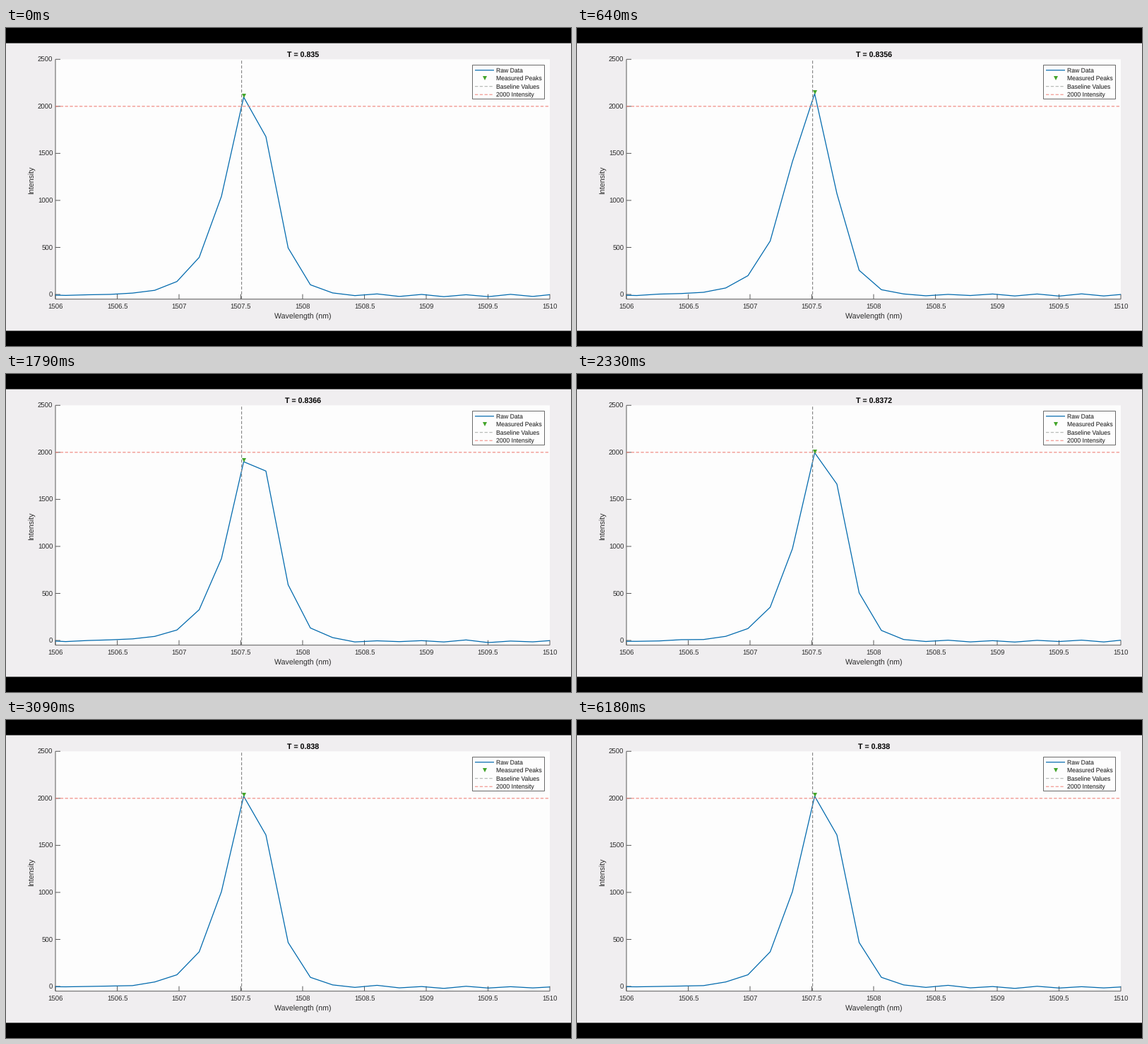
These frames come from a looping animation (800x450 px, 6670 ms). A matplotlib script:

```python
import numpy as np
import matplotlib.pyplot as plt
from matplotlib.animation import FuncAnimation
from matplotlib.patches import Rectangle

W, H, DPI = 800, 450, 100
FRAMES, INTERVAL = 230, 29

LEFT, RIGHT, TOP, BOTTOM = 70, 770, 44.3, 383.7
INK, AXIS, BLUE, GREEN = "#2b2b2b", "#5a5a5a", "#0069ad", "#43a52a"
RED, GRAY, PAPER = "#ee8078", "#808080", "#fdfdfd"

# Moments (ms) at which T advances by 0.0002
STEPS = (30, 210, 520, 1090, 1180, 1270, 1580, 1700, 1940,
         2210, 2270, 2450, 2550, 2880, 3000)

# The peak swings left, then right, and settles
SWING_STEPS = (0, 3, 6, 11, 15)
SWING = (0, -0.4, 0.22, 0.04, 0)

K = np.arange(-1, 23)          # sample index
XS = 84.6 + 31.49 * K
NOISE = np.random.default_rng(7).normal(0, 4, (len(STEPS) + 1, len(K)))

plt.rcParams["font.family"] = "Liberation Sans"
plt.rcParams["text.hinting"] = "none"
plt.rcParams["lines.scale_dashes"] = False


def pt(px):
    return px * 72 / DPI


def y_px(value):
    return BOTTOM - (value + 50) * (BOTTOM - TOP) / 2550


def x_px(nm):
    return LEFT + (nm - 1506) * (RIGHT - LEFT) / 4


def spectrum(step):
    """Lopsided peak: exponential flanks with a rounded top, plus ripple."""
    u = K - 8 - np.interp(step, SWING_STEPS, SWING)
    gain = np.interp(step, (0, 3), (1.04, 1))
    rise = 3.24 * np.exp(-1.05 * u)
    fall = 0.71 * np.exp(1.65 * u)
    peak = 1e4 * gain * (rise**0.7 + fall**0.7) ** (-1 / 0.7)
    ripple = np.where(K > 12, 9 * np.cos(np.pi * K) - 7, 0)
    dip = -12 * np.exp(-np.abs(K))
    return peak + ripple + dip + NOISE[step]


fig = plt.figure(figsize=(W / DPI, H / DPI), dpi=DPI, facecolor="#f0eef0")
ax = fig.add_axes([0, 0, 1, 1])
ax.set(xlim=(0, W), ylim=(H, 0))
ax.axis("off")


def rect(x0, y0, x1, y1, face, edge="none", z=0):
    patch = Rectangle((x0, y0), x1 - x0, y1 - y0, facecolor=face,
                      edgecolor=edge, linewidth=pt(1), zorder=z, snap=False)
    return ax.add_patch(patch)


def line(xs, ys, color, width=1.0, dashed=False, z=2):
    style = (0, (pt(4.3), pt(2.5))) if dashed else "-"
    return ax.plot(xs, ys, color=color, linewidth=pt(width), linestyle=style,
                   dash_capstyle="butt", solid_capstyle="butt",
                   solid_joinstyle="round", zorder=z, snap=False)[0]


def label(x, y, text, px, ha="center", color=INK, **kw):
    """Text whose capitals are centred on y."""
    return ax.text(x, y + 0.36 * px, text, fontsize=pt(px), ha=ha,
                   va="baseline", color=color, zorder=8, **kw)


def triangle(x, y, z):
    return ax.plot([x], [y], "v", color=GREEN, markersize=pt(6.6),
                   markeredgewidth=0, zorder=z, snap=False)[0]


def draw_axes():
    rect(0, 0, W, 21.5, "black")
    rect(0, 428.5, W, H, "black")
    line([LEFT, LEFT], [TOP, BOTTOM], AXIS)
    line([LEFT, RIGHT], [BOTTOM, BOTTOM], AXIS)
    for value in range(0, 2501, 500):
        y = y_px(value)
        line([LEFT, LEFT + 7], [y, y], AXIS)
        label(66.3, y + 0.5, str(value), 9.6, "right")
    for nm in np.arange(1506, 1510.1, 0.5):
        x = x_px(nm)
        line([x, x], [BOTTOM, BOTTOM - 7], AXIS)
        label(x, 394.7, f"{nm:g}", 9.6)
    label(420, 408, "Wavelength (nm)", 10.6)
    ax.text(39.6, 215.5, "Intensity", fontsize=pt(10.6), rotation=90,
            rotation_mode="anchor", ha="center", va="baseline", color=INK)
    line([333.6, 333.6], [BOTTOM, TOP], GRAY, 1.1, True, 4)
    line([LEFT, RIGHT], [y_px(2000)] * 2, RED, 1.1, True, 4)


def draw_legend():
    rect(660.5, 52.5, 762.5, 100.5, PAPER, "#6a6a6a", 6)
    rows = ("Raw Data", "Measured Peaks", "Baseline Values", "2000 Intensity")
    ys = [59.7 + 11.5 * i for i in range(4)]
    for y, text in zip(ys, rows):
        label(694.2, y, text, 8.7, "left", "#111111")
    ends = [664, 691]
    line(ends, [ys[0]] * 2, BLUE, 1.2, z=7)
    triangle(677.5, ys[1], 7)
    line(ends, [ys[2]] * 2, "#a8aca8", 1.0, True, 7)
    line(ends, [ys[3]] * 2, RED, 1.0, True, 7)


paper = rect(LEFT, TOP, RIGHT, BOTTOM, PAPER)
draw_axes()
draw_legend()
curve = line(XS, XS, BLUE, 1.25, z=3)
curve.set_clip_path(paper)
marker = triangle(0, 0, 5)
title = label(420.5, 37.2, "", 10.6, color="black", weight="bold")


def update(i):
    now = i * INTERVAL + INTERVAL / 2
    step = sum(now >= t for t in STEPS)
    values = spectrum(step)
    top = int(np.argmax(values))
    curve.set_ydata(y_px(values))
    marker.set_data([XS[top]], [y_px(values[top]) - 1.8])
    title.set_text(f"T = {0.835 + 0.0002 * step:.4g}")
    return curve, marker, title


anim = FuncAnimation(fig, update, frames=FRAMES, interval=INTERVAL,
                     repeat=True, repeat_delay=0, blit=False)
plt.show()
```
